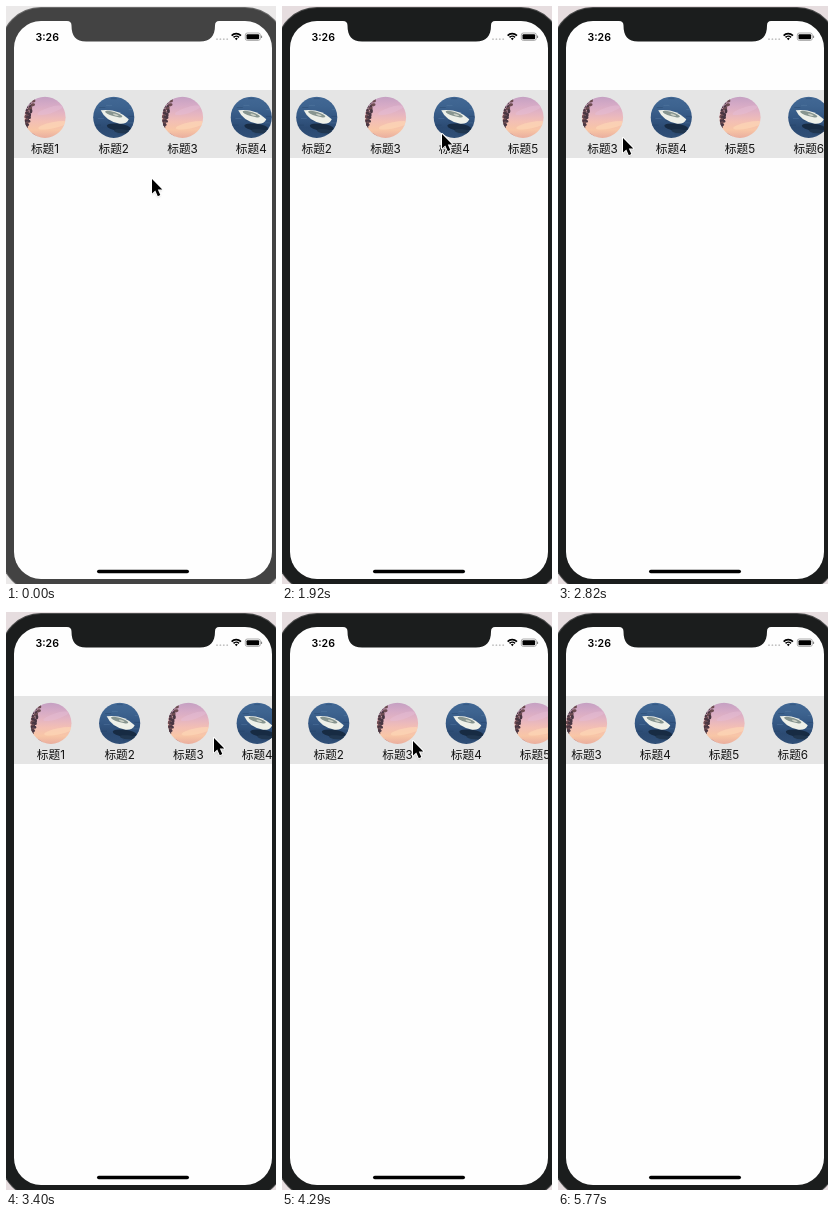
An HTML page with a canvas for the animation above (5920 ms loop, 270x578 px).

```html
<!DOCTYPE html>
<html lang="zh">
<head>
<meta charset="utf-8">
<style>
  html, body { margin: 0; width: 100%; height: 100%; overflow: hidden; background: #e8e2e3; }
  canvas { display: block; width: 270px; height: 578px; }
</style>
</head>
<body>
<canvas id="stage"></canvas>
<script>
const W = 270, H = 578, STEP = 148, STEPS = 40;
const PITCH = 68.75, COUNT = 6, MAX_SCROLL = 148;
const SCREEN = { x: 8, y: 15, w: 258, h: 558, r: 27 };
const WINDOW_ACTIVE_FROM = 11;

const canvas = document.getElementById('stage');
const ctx = canvas.getContext('2d');
const ratio = window.devicePixelRatio || 1;
canvas.width = W * ratio;
canvas.height = H * ratio;

// Pointer visits: [step, x, y]; it is off stage between the lists.
const visits = [
  [[0, 146, 173], [1, 152, 200], [2, 172, 325], [3, 196, 549]],
  [[8, 194, 298], [9, 216, 195], [10, 235, 131], [11, 233, 128], [12, 209, 128],
   [13, 160, 128], [14, 100, 130], [15, 66, 131], [17, 52, 133], [18, 49, 133],
   [19, 65, 132], [20, 104, 130], [21, 152, 128], [22, 192, 126], [23, 208, 126],
   [26, 206, 127], [27, 192, 127], [29, 131, 129], [31, 50, 133], [32, 16, 135],
   [33, 26, 147], [34, 60, 200], [36, 166, 430], [37, 213, 540], [38, 232, 562]]
];

const drags = [
  { from: 11, to: 15, grab: 233, base: 0 },
  { from: 18, to: 23, grab: 49, base: MAX_SCROLL },
  { from: 27, to: 32, grab: 192, base: 0 }
];

function pointerAt(step) {
  const keys = visits.find(v => step >= v[0][0] && step <= v[v.length - 1][0]);
  if (!keys) return null;
  const i = Math.max(1, keys.findIndex(k => k[0] >= step));
  const [a, b] = [keys[i - 1], keys[i]];
  const u = (step - a[0]) / (b[0] - a[0]);
  return { x: a[1] + (b[1] - a[1]) * u, y: a[2] + (b[2] - a[2]) * u };
}

const rubber = d => Math.sign(d) * SCREEN.w * (1 - 1 / (Math.abs(d) * 0.55 / SCREEN.w + 1));

function scrollAt(step) {
  const drag = drags.filter(d => d.from <= step).pop();
  if (!drag) return 0;
  const raw = drag.base + drag.grab - pointerAt(Math.min(step, drag.to)).x;
  const limit = Math.min(MAX_SCROLL, Math.max(0, raw));
  const over = rubber(raw - limit) * Math.pow(0.3, Math.max(0, step - drag.to));
  return limit + (step > drag.to && Math.abs(over) < 2 ? 0 : over);
}

function roundRect(x, y, w, h, r, color) {
  ctx.beginPath();
  ctx.roundRect(x, y, w, h, r);
  ctx.fillStyle = color;
  ctx.fill();
}

function polygon(points, color) {
  ctx.beginPath();
  points.forEach(([x, y]) => ctx.lineTo(x, y));
  ctx.closePath();
  ctx.fillStyle = color;
  ctx.fill();
}

function oval(x, y, rx, ry, color, turn = 0) {
  ctx.beginPath();
  ctx.ellipse(x, y, rx, ry, turn, 0, 7);
  ctx.fillStyle = color;
  ctx.fill();
}

function fillGradient(stops) {
  const g = ctx.createLinearGradient(0, -21, 0, 21);
  stops.forEach((c, i) => g.addColorStop(i / (stops.length - 1), c));
  ctx.fillStyle = g;
  ctx.fillRect(-21, -21, 42, 42);
}

function drawSunset() {
  fillGradient(['#c4a0c2', '#d5aac6', '#e4b4c2', '#f3bfb4', '#f8c6a6', '#e9ad9e']);
  oval(8, 8, 15, 3, 'rgba(255,218,184,.6)', -0.2);
  oval(5, -7, 13, 3, 'rgba(230,190,214,.5)', -0.3);
  for (let i = 0; i < 24; i++) {
    const y = -20 + i * 1.25;
    const reach = 9 * (1 - i / 25);
    oval(-19 + reach * (0.5 + 0.5 * Math.sin(i * 2.4)), y, 2.4, 1.5, i % 3 ? '#493642' : '#6d4c51', i);
  }
  oval(-13, 19, 8, 3, '#b98182', 0.5);
}

function drawBoat() {
  fillGradient(['#426895', '#3d638f', '#345783', '#2b4a72', '#304f77']);
  for (let i = 0; i < 18; i++) {
    const x = 18 * Math.sin(i * 4.1);
    ctx.fillStyle = i % 2 ? 'rgba(115,150,187,.28)' : 'rgba(25,48,80,.3)';
    ctx.fillRect(x - 3, -19 + i * 2.2, 6, 0.8);
  }
  oval(5, 10, 12, 3.5, '#172b43', 0.12);
  oval(8, 14, 8, 2, '#20364f', 0.1);
  ctx.beginPath();
  ctx.moveTo(-13, -7);
  ctx.quadraticCurveTo(4, -9, 15, 2);
  ctx.quadraticCurveTo(13, 7, 6, 6.5);
  ctx.quadraticCurveTo(-8, 4, -13, -7);
  ctx.fillStyle = '#eef0e9';
  ctx.fill();
  oval(0, -3.2, 9, 2.1, '#879590', 0.3);
  oval(2, -2.5, 3, 0.9, '#c9cec4', 0.3);
}

function drawItem(index, scroll) {
  const x = 39 + index * PITCH - scroll;
  ctx.save();
  ctx.translate(x, 111.3);
  ctx.beginPath();
  ctx.arc(0, 0, 20.6, 0, 7);
  ctx.clip();
  index % 2 ? drawBoat() : drawSunset();
  ctx.restore();
  ctx.fillStyle = '#111';
  ctx.font = '11.7px Inter, "Noto Sans CJK SC", "Noto Sans CJK", sans-serif';
  ctx.textAlign = 'center';
  ctx.fillText('标题' + (index + 1), x, 146.8);
}

function drawStatusBar() {
  ctx.fillStyle = '#000';
  ctx.font = '600 10.6px Inter, sans-serif';
  ctx.textAlign = 'left';
  ctx.fillText('3:26', 29.5, 34.5);
  for (let i = 0; i < 4; i++) oval(211 + i * 3.4, 33.2, 0.9, 0.9, '#c2c2c2');

  ctx.strokeStyle = '#000';
  ctx.lineWidth = 1.6;
  for (const r of [6.4, 3.8]) {
    ctx.beginPath();
    ctx.arc(230.3, 34, r, -Math.PI * 0.76, -Math.PI * 0.24);
    ctx.stroke();
  }
  polygon([[228.8, 32.4], [230.3, 31.7], [231.8, 32.4], [230.3, 34.2]], '#000');

  ctx.strokeStyle = '#888';
  ctx.lineWidth = 0.7;
  ctx.beginPath();
  ctx.roundRect(239.3, 27, 15, 7.4, 2);
  ctx.stroke();
  roundRect(240.5, 28.2, 12.6, 5, 1, '#000');
  roundRect(255, 29.4, 1.1, 2.6, 0.5, '#888');
}

function drawNotch(color) {
  ctx.beginPath();
  ctx.moveTo(61, 14);
  ctx.lineTo(61, 15);
  ctx.quadraticCurveTo(65.5, 15, 65.5, 19.5);
  ctx.bezierCurveTo(65.5, 30, 70, 35.5, 80, 35.5);
  ctx.lineTo(194, 35.5);
  ctx.bezierCurveTo(204, 35.5, 209, 30, 209, 19.5);
  ctx.quadraticCurveTo(209, 15, 213, 15);
  ctx.lineTo(213, 14);
  ctx.fillStyle = color;
  ctx.fill();
}

function drawPointer({ x, y }) {
  ctx.save();
  ctx.translate(x, y);
  const arrow = [[0, 0], [0, 14.5], [3.3, 11.4], [5.8, 17.2], [8.3, 16.1], [5.8, 10.4], [10.3, 10.4]];
  ctx.shadowColor = 'rgba(0,0,0,.35)';
  ctx.shadowBlur = 2 * ratio;
  ctx.shadowOffsetY = ratio;
  polygon(arrow, '#000');
  ctx.shadowColor = 'transparent';
  ctx.strokeStyle = '#fff';
  ctx.lineWidth = 2;
  ctx.lineJoin = 'round';
  ctx.stroke();
  polygon(arrow, '#000');
  ctx.restore();
}

function draw(step) {
  const active = step >= WINDOW_ACTIVE_FROM;
  const bezel = active ? '#1b1d1d' : '#434343';
  const scroll = scrollAt(step);
  const pointer = pointerAt(step);

  ctx.setTransform(ratio, 0, 0, ratio, 0, 0);
  ctx.fillStyle = active ? '#e6dddf' : '#ebe9e9';
  ctx.fillRect(0, 0, W, H);
  roundRect(-6, 1, 286, 586, 41, active ? '#4b4c4c' : '#6a6a6a');
  roundRect(-5, 2, 284, 584, 40, bezel);
  roundRect(SCREEN.x, SCREEN.y, SCREEN.w, SCREEN.h, SCREEN.r, '#fefefe');

  ctx.save();
  ctx.beginPath();
  ctx.rect(SCREEN.x, 84, SCREEN.w, 68);
  ctx.clip();
  ctx.fillStyle = '#e5e5e5';
  ctx.fillRect(SCREEN.x, 84, SCREEN.w, 68);
  for (let i = 0; i < COUNT; i++) drawItem(i, scroll);
  ctx.restore();

  drawNotch(bezel);
  drawStatusBar();
  roundRect(91, 563.7, 92, 3.6, 1.8, '#000');
  if (pointer) drawPointer(pointer);
}

function tick() {
  draw(Math.floor((performance.now() + 5) / STEP) % STEPS);
  requestAnimationFrame(tick);
}
tick();
</script>
</body>
</html>
```
